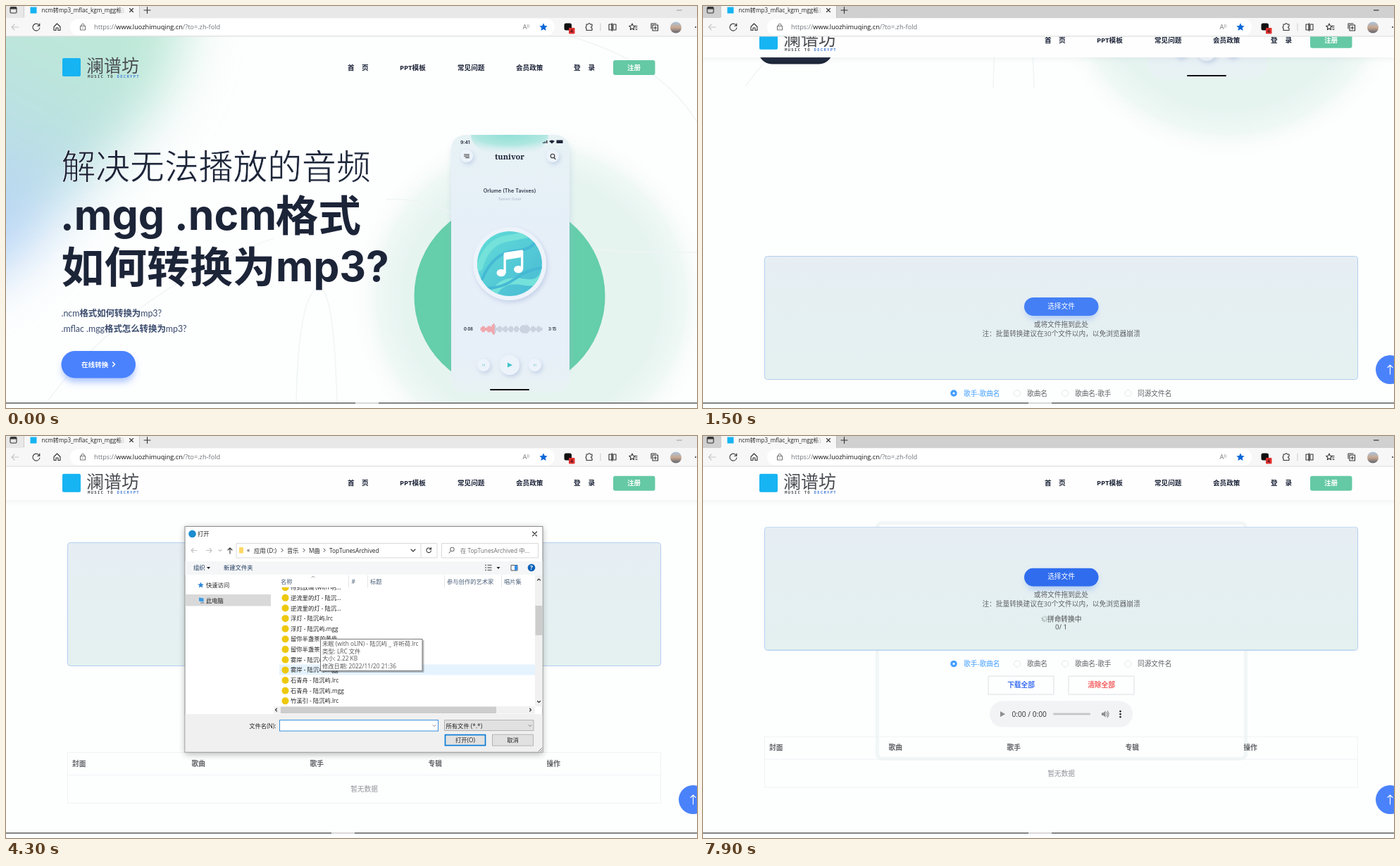
Animation of 981x571 px, one loop 8 s. Source, as an HTML page:

```html
<!DOCTYPE html>
<html lang="zh-CN">
<head>
<meta charset="utf-8">
<title>音频转换</title>
<style>
html, body { margin: 0; width: 100%; height: 100%; overflow: hidden; background: #fdfefe; }
svg { display: block; width: 100vw; height: 100vh; }
text { font-family: "Open Sans", "Noto Sans CJK SC", "Noto Sans CJK", sans-serif; white-space: pre; }
.line { fill: none; stroke: #333; stroke-width: 1.1; stroke-linecap: round; stroke-linejoin: round; }
.mid { text-anchor: middle; }
.bold { font-weight: 700; }
.ui { font-size: 9.7px; fill: #606266; }
.dlg { font-size: 8.3px; fill: #222; }
.head { font-family: Inter, "Noto Sans CJK SC", "Noto Sans CJK", sans-serif; font-weight: 700; }
.sub { font-family: Lato, "Noto Sans CJK SC", "Noto Sans CJK", sans-serif; font-size: 12.4px; fill: #3a4b6d; }
.phone text { font-family: Inter, sans-serif; fill: #20263a; }

/* every part shares one 8 s clock that ticks each 100 ms (1.25%) */
#strip, #min, #seg, #cta, #ctaGlow, #page, #sticky, #up, #pick, #dialog, #content, #list, #thumb,
#hover, #tip, #fname, #trace, #status { animation: 8s step-end infinite; }
#strip { animation-name: strip; }
@keyframes strip { 0%, 35% { fill: #e8e8e8 } 12.5%, 65% { fill: #d0d0d0 } }
#min { animation-name: min; }
@keyframes min { 0%, 35% { stroke: #aaa } 12.5%, 65% { stroke: #333 } }
#seg { animation-name: seg; }
@keyframes seg { 0% { transform: none } 12.5% { transform: translateX(-34px) } }
#cta { animation-name: cta; }
@keyframes cta { 0% { fill: #4a82fd } 12.5% { fill: #1c2438 } }
#ctaGlow { animation-name: off; }
@keyframes off { 0% { opacity: 1 } 12.5% { opacity: 0 } }
#page { animation-name: scroll; }
@keyframes scroll {
  0% { transform: translateY(0) }
  15% { transform: translateY(-20px) }
  16.25% { transform: translateY(-121px) }
  17.5% { transform: translateY(-277px) }
  18.75% { transform: translateY(-446px) }
  20% { transform: translateY(-583px) }
  21.25% { transform: translateY(-647.5px) }
  22.5% { transform: translateY(-650px) }
  93.75% { transform: translateY(-652px) }
  95% { transform: translateY(-658px) }
  96.25% { transform: translateY(-664px) }
  97.5% { transform: translateY(-669px) }
  98.75%, 100% { transform: translateY(-672.4px) }
}
#sticky { animation-name: drop; }
@keyframes drop {
  0% { transform: translateY(-70px) }
  17.5% { transform: translateY(-40px) }
  18.75% { transform: translateY(-18px) }
  20% { transform: translateY(-5px) }
  21.25% { transform: translateY(-.7px) }
  22.5%, 100% { transform: none }
}
#up { animation-name: up; }
@keyframes up { 0% { opacity: 0 } 15%, 100% { opacity: 1 } }
#pick { animation-name: pick; }
@keyframes pick { 0% { fill: #447ff6 } 28.75%, 100% { fill: #2f6dee } }
#dialog { animation-name: dialog; transform-origin: 508px 288.5px; }
@keyframes dialog {
  0%, 65%, 100% { opacity: 0; transform: none }
  42.5% { opacity: .42; transform: scale(.972) }
  43.75% { opacity: 1; transform: none }
  63.75% { opacity: .45; transform: scale(.965) }
}
#content { animation-name: content; }
@keyframes content { 0% { opacity: 0 } 43.75%, 100% { opacity: 1 } }
#list { animation-name: list; }
@keyframes list {
  0% { transform: none }
  48.75% { transform: translateY(-42px) }
  50% { transform: translateY(-84px) }
  52.5%, 100% { transform: translateY(-126px) }
}
#thumb { animation-name: thumb; }
@keyframes thumb {
  0% { transform: translateY(-32px) }
  48.75% { transform: translateY(-21px) }
  50% { transform: translateY(-11px) }
  52.5%, 100% { transform: none }
}
#hover { animation-name: hover; }
@keyframes hover { 0% { fill: #fff } 52.5% { fill: #e5f3ff } 57.5%, 100% { fill: #cce8ff } }
#tip { animation-name: tip; }
@keyframes tip { 0%, 55%, 100% { opacity: 0 } 47.5% { opacity: 1 } }
#fname { animation-name: fname; }
@keyframes fname { 0% { opacity: 0 } 58.75%, 100% { opacity: 1 } }
#trace { animation-name: trace; }
@keyframes trace { 0% { opacity: 0 } 65%, 100% { opacity: 1 } }
#status { animation-name: status; }
@keyframes status { 0% { opacity: 0 } 71.25%, 100% { opacity: 1 } }
#spin { transform-origin: 485px 282px; animation: spin 1s steps(10) infinite; }
@keyframes spin { to { transform: rotate(360deg) } }
</style>
</head>
<body>
<svg viewBox="0 0 981 571">
<defs>
  <clipPath id="view"><path d="M0 43H981V563H0z"/></clipPath>
  <clipPath id="rows"><path d="M380 215.500H751V383H380z"/></clipPath>
  <clipPath id="disc"><circle cx="715" cy="366" r="46"/></clipPath>
  <clipPath id="title"><path d="M50 0H168V17H50z"/></clipPath>
  <linearGradient id="aurora" gradientUnits="userSpaceOnUse" x1="150" y1="60" x2="10" y2="310"><stop offset="0" stop-color="#bde8d8"/><stop offset=".45" stop-color="#bce2e0"/><stop offset="1" stop-color="#b9d6f5"/></linearGradient>
  <radialGradient id="blob"><stop offset=".72" stop-color="#e6f4f0"/><stop offset=".86" stop-color="#eff8f5"/><stop offset="1" stop-color="#fcfefd" stop-opacity="0"/></radialGradient>
  <radialGradient id="notch" cy="0" r=".9"><stop offset="0" stop-color="#8fe0d6"/><stop offset=".5" stop-color="#b0e7e0"/><stop offset="1" stop-color="#e6f0f6" stop-opacity="0"/></radialGradient>
  <linearGradient id="body" x2="0" y2="1"><stop offset="0" stop-color="#e7f2f5"/><stop offset=".4" stop-color="#e6eff8"/><stop offset=".85" stop-color="#e7eff8"/><stop offset="1" stop-color="#e8f2f3"/></linearGradient>
  <linearGradient id="teal" x2="1" y2="1"><stop offset="0" stop-color="#62ddd8"/><stop offset="1" stop-color="#48b9d4"/></linearGradient>
  <linearGradient id="panel" x2="0" y2="1"><stop offset="0" stop-color="#e6eef3"/><stop offset="1" stop-color="#e4f1f0"/></linearGradient>
  <linearGradient id="fade"><stop offset="0" stop-color="#f7f7f7" stop-opacity="0"/><stop offset="1" stop-color="#f7f7f7"/></linearGradient>
  <linearGradient id="photo" x2="0" y2="1"><stop offset="0" stop-color="#a9c4dc"/><stop offset=".5" stop-color="#c9a78f"/><stop offset="1" stop-color="#5f6470"/></linearGradient>
  <filter id="soft" x="-30%" y="-50%" width="160%" height="220%"><feGaussianBlur stdDeviation="5"/></filter>
  <filter id="haze" x="-50%" y="-50%" width="200%" height="200%" color-interpolation-filters="sRGB"><feGaussianBlur stdDeviation="38"/></filter>
  <filter id="lift" x="-40%" y="-40%" width="180%" height="180%"><feDropShadow dx="2" dy="3" stdDeviation="3" flood-color="#8ea3cf" flood-opacity=".4"/></filter>
  <g id="nav">
    <rect x="80" y="74" width="26" height="26" rx="2" fill="#16b4f2"/>
    <text x="114" y="94" font-size="25" fill="#4a4d52">澜谱坊</text>
    <text x="116" y="102" font-size="5.600" font-weight="700" fill="#4a4d52" style="font-family:'DejaVu Sans Mono',monospace" letter-spacing="1.250">MUSIC TO <tspan fill="#4a82d8">DECRYPT</tspan></text>
    <g class="bold" font-size="9.600" fill="#1c2438">
      <text x="485" y="90.600">首</text><text x="505" y="90.600">页</text>
      <text x="559" y="90.600">PPT模板</text><text x="641" y="90.600">常见问题</text>
      <text x="724" y="90.600">会员政策</text><text x="806" y="90.600">登</text><text x="826.500" y="90.600">录</text>
      <rect x="862" y="77" width="59.500" height="21" rx="3" fill="#65c9a5"/>
      <text x="891.500" y="90.800" class="mid" fill="#fff">注册</text>
    </g>
  </g>
</defs>

<rect width="981" height="571" fill="#fdfefe"/>
<g clip-path="url(#view)">
  <rect id="trace" x="247.500" y="123.500" width="523" height="335" rx="7" fill="none" stroke="#f1f6f6" stroke-width="5"/>
  <g id="page">
    <g id="hero">
      <path d="M-120-60H262Q255 90 205 150Q130 240 60 310Q20 390-120 420z" fill="url(#aurora)" filter="url(#haze)"/>
      <ellipse cx="746" cy="415" rx="254" ry="246" fill="url(#blob)"/>
      <g fill="none" stroke="#eef4f4" stroke-width="1.300">
        <path d="M540 275Q600 270 660 310T981 350M800 43Q930 80 981 165"/>
        <path d="M412 563Q415 420 440 402T470 563M60 560Q180 400 380 330"/>
      </g>
      <use href="#nav"/>
      <text x="78.500" y="245.500" font-size="48.800" font-weight="300" fill="#1c2438" stroke="#f6fafb" stroke-width=".8">解决无法播放的音频</text>
      <g fill="#1c2438">
        <text x="77" y="318" font-size="59" class="head">.mgg .ncm</text><text x="382.500" y="319.500" font-size="60.800" class="head">格式</text>
        <text x="78.500" y="392.500" font-size="60.800" class="head">如何转换为</text><text x="383" y="391" font-size="58.500" class="head">mp3?</text>
      </g>
      <text x="78.500" y="440.500" class="sub">.ncm<tspan class="bold">格式如何转换为</tspan>mp3?</text>
      <text x="78.500" y="462.500" class="sub">.mflac .mgg<tspan class="bold">格式怎么转换为</tspan>mp3?</text>
      <rect id="ctaGlow" x="80" y="497" width="103" height="37" rx="18" fill="#4a82fd" fill-opacity=".45" filter="url(#soft)"/>
      <rect id="cta" x="78.500" y="490" width="105.500" height="38.500" rx="19.250"/>
      <text x="107" y="512.700" font-size="9.600" class="bold" fill="#fff">在线转换</text>
      <path class="line" style="stroke:#fff;stroke-width:1.500" d="M151.500 506l3 3-3 3"/>

      <circle cx="715" cy="412" r="135.500" fill="#65ceaa"/>
      <g class="phone">
        <rect x="633" y="190" width="168" height="335" rx="20" fill="#9db0d0" opacity=".3" filter="url(#soft)"/>
        <rect x="632" y="183" width="168" height="366" rx="20" fill="url(#body)"/>
        <path d="M660 183H770A55 32 0 0 1 660 183" fill="url(#notch)"/>
        <text x="645" y="196" font-size="6.800" font-weight="600">9:41</text>
        <path d="M762 195v-1.500h1.500v1.500m1 0v-2.500h1.500v2.500m1 0v-4h1.500v4M771 192q4-3 8 0l-4 3.500zM781.500 190.500h9v4.500h-9z" fill="#20263a"/>
        <g fill="#edf3fa" filter="url(#lift)"><circle cx="654" cy="213" r="9"/><circle cx="776" cy="213" r="9"/><circle cx="678" cy="510" r="9"/><circle cx="715" cy="510" r="14"/><circle cx="751" cy="510" r="9"/><circle cx="715" cy="366" r="52"/></g>
        <path class="line" d="M650.500 211h7M650.500 213.300h7M652.500 215.500h5M778 215.500l2 2"/><circle class="line" cx="776" cy="213" r="2.800"/>
        <text x="715" y="217.500" class="mid" font-size="11" font-weight="900" style="font-family:'Noto Serif',serif">tunivor</text>
        <text x="715" y="264.500" class="mid" font-size="7.300" font-weight="500">Orlume (The Tavixes)</text>
        <text x="715" y="276" class="mid" font-size="5" style="fill:#a5afc0">Tunivor Cover</text>
        <g clip-path="url(#disc)">
          <rect x="669" y="320" width="92" height="92" fill="url(#teal)"/>
          <g fill="none" stroke-linecap="round">
            <path d="M672 372Q682 335 712 330T752 322M690 415Q700 385 735 392T765 350" stroke="#74e2da" stroke-width="9"/>
            <path d="M676 388Q692 350 722 348T756 326M672 400Q700 404 722 388T764 372" stroke="#45b9d4" stroke-width="4"/>
          </g>
        </g>
        <g fill="#fff"><ellipse cx="703" cy="379" rx="6.500" ry="5.300"/><ellipse cx="727.500" cy="374" rx="6.500" ry="5.300"/><path d="M706.500 352.500q0-2 2-2.500l23.500-3.500q2.300-.3 2.300 2V374H731V357l-21.200 3.500V379h-3.300z"/></g>
        <text x="650" y="461" font-size="5.700" font-weight="600">0:08</text><text x="770" y="461" font-size="5.700" font-weight="600">3:15</text>
        <g id="wave"></g>
        <path d="M712 506.500l7 3.500-7 3.500z" fill="#3fc4cc"/>
        <path d="M680 508l-3 2 3 2zM749 508l3 2-3 2z" fill="#a9dbe4"/><path d="M676.500 508v4M752.500 508v4" stroke="#a9dbe4" stroke-width=".8"/>
        <rect x="687" y="544" width="56" height="2" rx="1" fill="#111"/>
      </g>
    </g>

    <g transform="translate(0 650)">
      <rect x="87.500" y="151.500" width="842" height="175" rx="4" fill="url(#panel)" stroke="#b3cff0"/>
      <rect x="459" y="216" width="100" height="24" rx="12" fill="#4480f6" opacity=".35" filter="url(#soft)"/>
      <rect id="pick" x="456" y="210" width="105.500" height="26" rx="13"/>
      <g class="ui mid">
        <text x="508.500" y="225.700" fill="#fff">选择文件</text>
        <text x="508.500" y="251.500">或将文件拖到此处</text>
        <text x="508.500" y="264.500">注：批量转换建议在30个文件以内，以免浏览器崩溃</text>
        <text x="451.500" y="379.700" class="bold" fill="#3a6df2">下载全部</text>
        <text x="565.500" y="379.700" class="bold" fill="#f55c5c">清除全部</text>
        <text x="508.500" y="505" fill="#909399">暂无数据</text>
      </g>
      <g id="status" class="ui">
        <g id="spin"></g>
        <text x="489" y="285.500" fill="#444">拼命转换中</text><text x="508.500" y="296.500" class="mid" fill="#444">0/ 1</text>
      </g>
      <circle cx="356" cy="346" r="4.700" fill="#409eff"/><circle cx="356" cy="346" r="1.600" fill="#fff"/>
      <g fill="#fff" stroke="#e2e5ea"><circle cx="446" cy="346" r="4.500"/><circle cx="514" cy="346" r="4.500"/><circle cx="603.500" cy="346" r="4.500"/></g>
      <g class="ui"><text x="370" y="349.600" fill="#409eff">歌手-歌曲名</text><text x="460" y="349.600">歌曲名</text><text x="528" y="349.600">歌曲名-歌手</text><text x="617" y="349.600">同源文件名</text></g>
      <path d="M405 363.500h93v26h-93zM519 363.500h93v26h-93z" fill="none" stroke="#dcdfe3"/>
      <rect x="407" y="399" width="203" height="37" rx="18.500" fill="#f1f3f4"/>
      <path d="M422 413.500l7 4-7 4z" fill="#8d8f91"/>
      <text x="438.500" y="421.200" font-size="10.200" fill="#333">0:00 / 0:00</text>
      <rect x="497" y="416" width="53" height="2.600" rx="1.300" fill="#c3c5c6"/>
      <path d="M566 415.500h2.500l3-2.500v9l-3-2.500h-2.500z" fill="#8d8f91"/><path class="line" style="stroke:#8d8f91" d="M573 415q2 2.500 0 5M574 413q4 4.500 0 9"/>
      <g fill="#222"><circle cx="592.500" cy="413.500" r="1.300"/><circle cx="592.500" cy="417.500" r="1.300"/><circle cx="592.500" cy="421.500" r="1.300"/></g>
      <path d="M87 449.500H929.500V521.500H87.500V449.500M87 481.500H929" fill="none" stroke="#f0f2f4"/>
      <g class="ui bold" fill="#909399"><text x="94" y="468.700">封面</text><text x="263.500" y="468.700">歌曲</text><text x="431.500" y="468.700">歌手</text><text x="599.500" y="468.700">专辑</text><text x="767.500" y="468.700">操作</text></g>
    </g>
  </g>
  <g id="sticky">
    <rect x="-10" y="40" width="1001" height="52" fill="#9aa" opacity=".16" filter="url(#soft)"/>
    <rect y="20" width="981" height="71" fill="#fefefe"/>
    <use href="#nav" y="-20.300"/>
  </g>
  <g id="up"><circle cx="975.500" cy="516.500" r="20.500" fill="#4a82fb"/><path class="line" style="stroke:#fff" d="M975.500 523v-13M972 513.500l3.500-3.500 3.500 3.500"/></g>
</g>
<path d="M0 564H981" stroke="#5a5a5a" stroke-width="1.600"/>
<path id="seg" d="M496 564h33" stroke="#d9d9d9" stroke-width="2"/>

<g id="chrome">
  <rect id="strip" width="981" height="17"/>
  <path d="M25 17V0H189V17zM0 17H981V43H0z" fill="#f7f7f7"/>
  <path d="M25.500 0v16M189.500 0v16" stroke="#bbb" stroke-width=".7"/>
  <path d="M0 43H981" stroke="#dadada"/>
  <rect x="6" y="1.500" width="9" height="8.500" rx="1.500" class="line"/><path d="M6 2h9v2.500h-9z" fill="#333"/>
  <rect x="34.500" y="1.500" width="9" height="9" fill="#16b4f2"/>
  <text x="50.500" y="9" font-size="8.100" fill="#222" clip-path="url(#title)">ncm转mp3_mflac_kgm_mgg格式转换</text>
  <rect x="158" width="11" height="16" fill="url(#fade)"/>
  <path class="line" d="M175.500 3.500l5 5m0-5l-5 5M196 6h9M200.500 1.500v9"/>
  <path id="min" d="M952 6h7.500" stroke-width="1.200"/>
  <rect x="91" y="18.500" width="688" height="23" rx="11.500" fill="#fff"/>
  <path class="line" style="stroke:#c5c5c5" d="M18 30H8.500M12 26l-4 4 4 4"/>
  <path class="line" d="M47.500 28a5 5 0 1 0 .4 3M47.800 25v3.200h-3.200M68 29.500l4.500-4.500 4.500 4.500v5h-3v-3.500h-3v3.500h-3z"/>
  <path class="line" style="stroke:#777" d="M105.500 28.500h7v5.500h-7zM107 28.500v-1.500q2-3.500 4 0v1.500M109 31v.5"/>
  <text x="125" y="33" font-size="9.200" fill="#70757a">https://<tspan fill="#111">www.luozhimuqing.cn</tspan>/?to=.zh-fold</text>
  <text x="733.500" y="33" font-size="9.500" fill="#777">A<tspan font-size="6" dy="-3">))</tspan></text>
  <path d="M763 24.300l1.700 3.700 4 .4-3 2.700.9 4-3.600-2.100-3.600 2.100.9-4-3-2.700 4-.4z" fill="#0a67d8"/>
  <rect x="792.500" y="24.500" width="10.500" height="10" rx="2.500" fill="#111"/>
  <rect x="799" y="31" width="8.500" height="8.500" rx="1" fill="#e03030"/><text x="803.200" y="37.800" font-size="6.500" class="mid">4</text>
  <path class="line" d="M824 26h2.500q1.500-3 3 0h2.500v3q-3 1 0 2.500v3h-8v-3q-2-1.500 0-2.500zM856 26h4v8h-4zM862 26h4v8h-4zM860.500 24.500v11"/>
  <path d="M844 24.500v11" stroke="#ccc"/>
  <path class="line" d="M889 25l1.300 3 3 .3-2.300 2.200.6 3.200-2.600-1.700-2.600 1.700.5-3.200-2.200-2.200 3-.3zM893 28.500h3M893.500 31h2.500M894 33.500h2M916 32v-7h7M918 27h7.500v8h-7.500zM921.800 29v4M919.800 31h4"/>
  <circle cx="951" cy="30.500" r="8" fill="url(#photo)"/>
  <circle cx="979" cy="30" r="1" fill="#333"/>
</g>

<g id="dialog">
  <rect x="254" y="130" width="508" height="322" fill="#000" opacity=".28" filter="url(#soft)"/>
  <rect x="254" y="128.500" width="508" height="320.500" fill="#fff" stroke="#8b8b8b"/>
  <path d="M254.500 395H761.500V448.500H254.500z" fill="#f0f0f0"/>
  <circle cx="264.500" cy="139" r="5.300" fill="#1b8ccf"/>
  <text x="272" y="142" class="dlg">打开</text>
  <path class="line" d="M747.500 136l6 6m0-6l-6 6"/>
  <path d="M751 197.500H761.500V384H751zM380 384H751V394.500H380z" fill="#f1f1f1"/>
  <rect id="thumb" x="751.500" y="241" width="10" height="42" fill="#cdcdcd"/>
  <rect x="390" y="384.500" width="306" height="9.500" fill="#cdcdcd"/>
  <g id="content">
    <path class="line" style="stroke:#c4c4c4" d="M271 162.500h-8m3-3l-3 3 3 3M284 162.500h8m-3-3l3 3-3 3M302 161.500l2 2 2-2"/>
    <path class="line" d="M318 167v-8m-3 3l3-3 3 3M575 161l3 3 3-3M603 160.500a3.300 3.300 0 1 0 .5 2.500M603.500 158.500v2.500h-2.500"/>
    <path d="M327 152.500H612V173H327zM589 152.500V173M618.500 152.500H755.500V173H618.500z" fill="none" stroke="#d9d9d9"/>
    <rect x="331" y="158" width="6" height="8.500" fill="#ffd766"/>
    <g class="dlg">
      <text x="342" y="165">«</text><text x="352" y="165.500">应用 (D:)</text><text x="399" y="165.500">音乐</text><text x="430" y="165.500">M曲</text><text x="459" y="165.500">TopTunesArchived</text>
      <text x="645" y="165.500" fill="#6d6d6d">在 TopTunesArchived 中...</text>
      <path class="line" style="stroke-width:.9" d="M391 160l2.300 2.300-2.300 2.300M422 160l2.300 2.300-2.300 2.300M451 160l2.300 2.300-2.300 2.300M629 166l2.500-2.500"/>
      <circle cx="633.500" cy="161" r="2.700" class="line" style="stroke:#777"/>
      <path d="M254.500 178H761.500V197H254.500z" fill="#f5f6f7"/>
      <text x="266" y="190" fill="#1e3a5f">组织</text><text x="309" y="190" fill="#1e3a5f">新建文件夹</text>
      <path d="M285 186h5l-2.500 3zM696.500 186h5l-2.500 3z" fill="#222"/>
      <path d="M680 183.500h2m1.500 0h6M680 187h2m1.500 0h6M680 190.500h2m1.500 0h6" stroke="#777" stroke-width="1.400"/>
      <path d="M717 183.500h9v7.500h-9z" fill="#fff" stroke="#555"/><path d="M722 183.500h4v7.500h-4z" fill="#3a8ee0"/>
      <circle cx="746" cy="187" r="5.300" fill="#0b62b8"/><text x="746" y="190" class="mid bold" fill="#fff">?</text>
      <path d="M254.500 225H376V241.500H254.500z" fill="#d9d9d9"/>
      <path d="M276.500 207.500l1.200 2.700 3 .3-2.200 2 .6 3-2.600-1.500-2.600 1.500.6-3-2.200-2 3-.3z" fill="#2f86d6"/>
      <path d="M274 229.500l6.500 1v5l-6.500-1z" fill="#3a9be6"/><path d="M276 237h5" stroke="#678"/>
      <text x="284" y="215">快速访问</text><text x="284" y="236.500">此电脑</text>
      <g clip-path="url(#rows)"><rect id="hover" x="388" y="324.500" width="363" height="15"/><g id="list"></g></g>
      <g fill="#4c607a"><text x="390" y="210">名称</text><text x="490.500" y="210">#</text><text x="517" y="210">标题</text><text x="626" y="210">参与创作的艺术家</text><text x="707" y="210">唱片集</text></g>
      <path d="M486.500 198v17M513.500 198v17M622.500 198v17M703.500 198v17" stroke="#e5e5e5"/>
      <path class="line" style="stroke:#888;stroke-width:.8" d="M434 201l2-2 2 2"/>
      <path class="line" d="M754.500 205l2-2 2 2M754.500 376.500l2 2 2-2M384.500 387l-2 2 2 2M743.500 387l2 2-2 2"/>
      <text x="383.500" y="414.500" text-anchor="end">文件名(N):</text>
      <rect x="388.500" y="403.500" width="225" height="15.500" fill="#fff" stroke="#3a90dc"/>
      <text id="fname" x="391" y="414.500">雾岸 - 陆沉屿.mgg</text>
      <path d="M622.500 403.500H749V418.500H622.500zM690.500 424H748.500V440H690.500z" fill="#e1e1e1" stroke="#b3b3b3"/>
      <rect x="623.500" y="424.500" width="57" height="15" fill="#e1e1e1" stroke="#0078d7" stroke-width="1.600"/>
      <text x="624.500" y="414.500">所有文件 (*.*)</text><text x="652" y="435" class="mid">打开(O)</text><text x="719.500" y="435" class="mid">取消</text>
      <path class="line" style="stroke:#666;stroke-width:.8" d="M606 410.500l2 2 2-2M742 410.500l2 2 2-2M756 448l5-5M759 448l2-2"/>
      <g id="tip">
        <rect x="448" y="290" width="145.500" height="46" fill="#000" opacity=".25"/>
        <rect x="446.500" y="288.500" width="144.500" height="45" fill="#fff" stroke="#777"/>
        <g fill="#575757"><text x="449" y="297.500">未眠 (with oLIN) - 陆沉屿 _ 许听荷.lrc</text><text x="449" y="308.500">类型: LRC 文件</text><text x="449" y="319">大小: 2.22 KB</text><text x="449" y="330">修改日期: 2022/11/20 21:36</text></g>
      </g>
    </g>
  </g>
</g>
</svg>
<script>
const add = (id, tag, attrs, text = '') => {
  const el = document.createElementNS(document.querySelector('svg').namespaceURI, tag);
  for (const key in attrs) el.setAttribute(key, attrs[key]);
  el.textContent = text;
  document.getElementById(id).append(el);
};

const singer = ' - 陆沉屿';
const pair = song => [`${song}${singer}.lrc`, `${song}${singer}.mgg`];
const cut = name => [name, name];
const files = [
  ...pair('半夏'), ...cut('未眠 (with oLIN)...'), ...pair('潮声'), '初雪' + singer + '.mgg',
  ...cut('待到放晴 (with 明...'), ...cut('逆流里的灯 - 陆沉...'), ...pair('浮灯'),
  ...cut('留你半盏茶的黄昏...'), ...pair('雾岸'), ...pair('石青舟'), ...pair('竹溪引'), ...pair('远帆')
];
files.forEach((name, i) => {
  const y = 224 + 14.65 * i;
  add('list', 'circle', { cx: 396.5, cy: y, r: 5, fill: '#eec80c' });
  add('list', 'text', { x: 404, y: y + 3 }, name);
});

// small ripples with two tall peaks
for (let i = 0; i < 44; i++) {
  const x = 674 + i * 2;
  const h = 2 + 7 * Math.abs(Math.sin(i * 0.8 + 0.4)) + 8 * Math.cos(Math.PI * (i - 8.5) / 22.5) ** 40;
  add('wave', 'rect', { x, y: 459 - h / 2, width: 1.2, height: h, fill: x < 694 ? '#f4797c' : '#b9bfd0' });
}

for (let i = 0; i < 8; i++) {
  add('spin', 'path', {
    d: 'M485 280v-2.500', stroke: '#444', 'stroke-width': 0.9,
    opacity: 0.35 + i * 0.08, transform: `rotate(${i * 45} 485 282)`
  });
}
</script>
</body>
</html>
```
